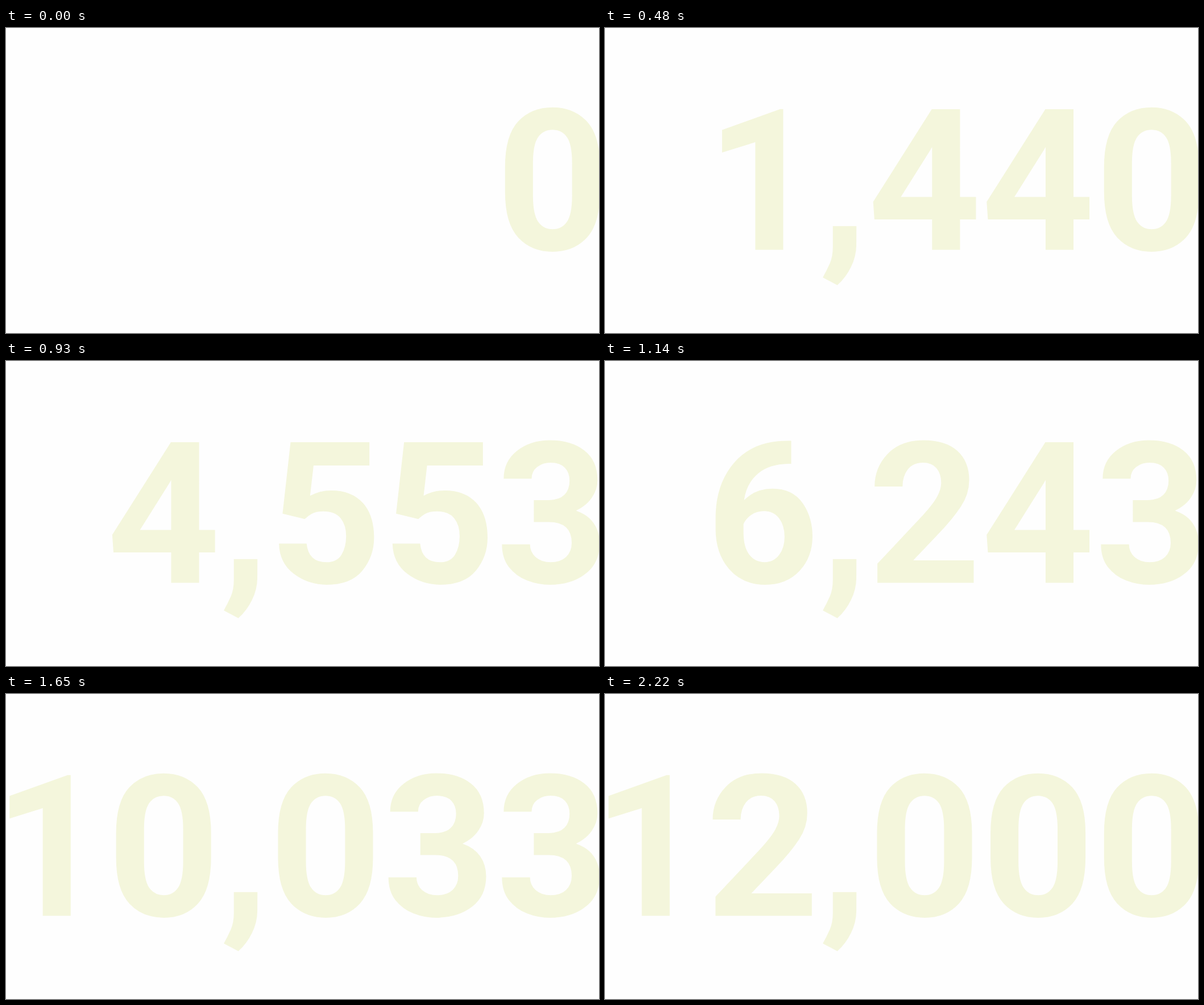
Animation, 1043 px wide and 537 px high, one loop 2.25 s. Source, as an HTML page:

```html
<!DOCTYPE html>
<html lang="en">
<head>
<meta charset="utf-8">
<title>Counter</title>
<style>
  html, body { margin: 0; width: 100%; height: 100%; overflow: hidden; background: #fefefe; }
  svg { display: block; width: 1043px; height: 537px; }
  text {
    font: 700 348px Roboto, sans-serif;
    font-kerning: none;
    text-anchor: end;
    fill: #f4f6dc;
  }
</style>
</head>
<body>
<svg viewBox="0 0 1043 537"><text id="counter" x="1061.1" y="390.5">0</text></svg>
<script>
  const LOOP = 2250, STEP = 30, LAST = LOOP / STEP - 1, TOTAL = 12000;
  const counter = document.getElementById('counter');
  const smoothstep = t => t * t * (3 - 2 * t);

  function render(ms) {
    const step = Math.floor((ms % LOOP) / STEP);
    const value = Math.round(TOTAL * smoothstep(step / LAST));
    const label = value.toLocaleString('en-US');
    if (counter.textContent !== label) counter.textContent = label;
  }

  const start = performance.now();
  function tick() {
    render(performance.now() - start);
    requestAnimationFrame(tick);
  }
  tick();
</script>
</body>
</html>
```
